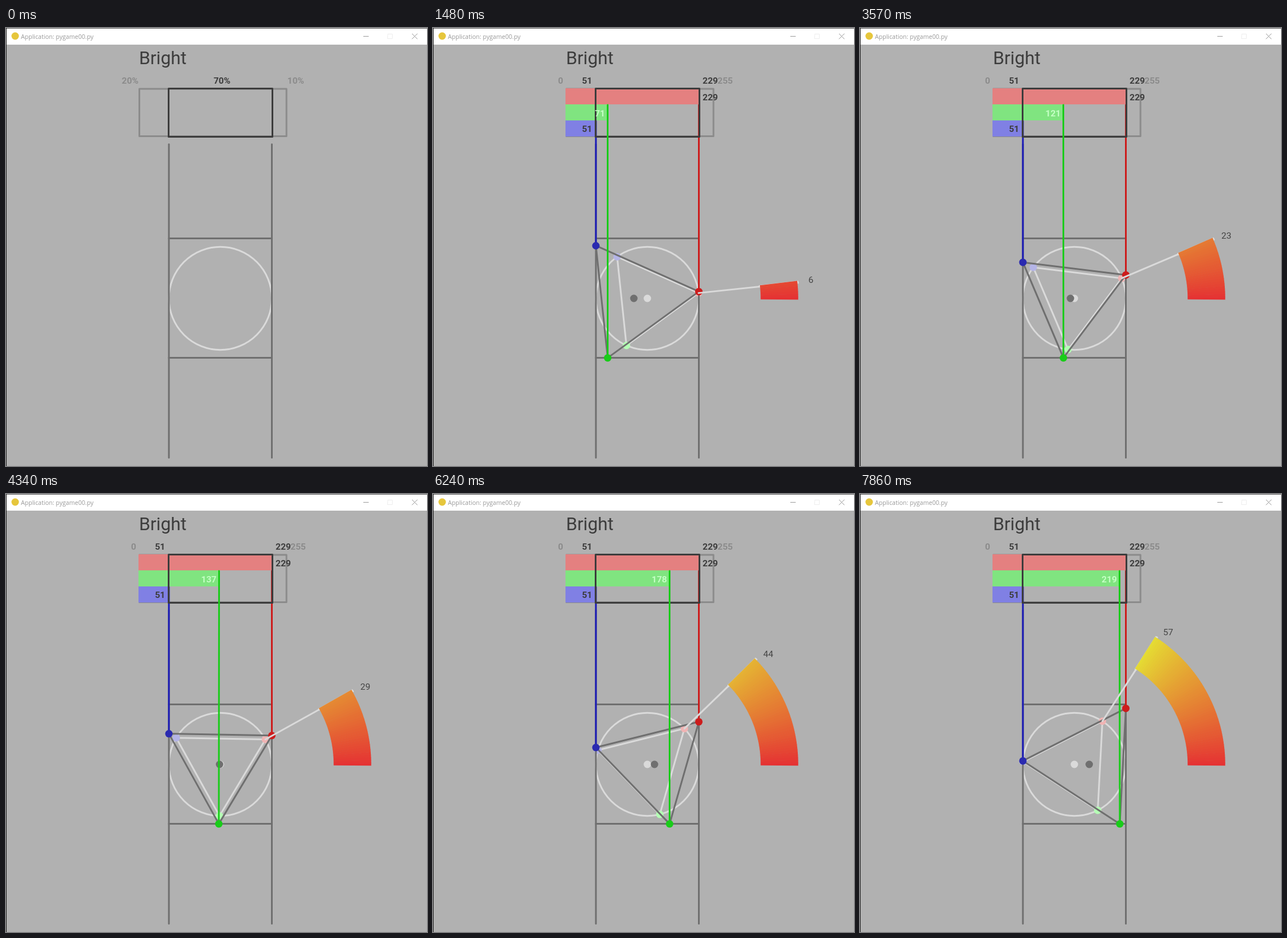
An HTML page with a canvas that plays this animation: 734x763 px, repeating every 7990 ms.

```html
<!DOCTYPE html>
<html lang="en">
<head>
<meta charset="utf-8">
<title>Bright</title>
<style>
html, body { margin: 0; width: 734px; height: 763px; overflow: hidden; }
canvas { display: block; }
</style>
</head>
<body>
<canvas id="stage" width="734" height="763"></canvas>
<script>
const ctx = document.getElementById('stage').getContext('2d');
const LOOP = 7990, INTRO = 760, FIRST = 718, STEP = 124, LAST_HUE = 57;
const LEFT = 284, RIGHT = 463.5, TOP = 366.5, BOTTOM = 574.5;
const CX = (LEFT + RIGHT) / 2, CY = 471, R = (RIGHT - LEFT) / 2;
const BAR_X = 231, BAR_Y = 105, BAR_H = 28;
const INK = '#3c3c3c', DARK = '#6f6f6f', GREY = '#8b8b8b', LIGHT = '#dadada', PAPER = '#b1b1b1';
const RED = '#cc1c1c', GREEN = '#19cc19', BLUE = '#1a1ab8';
const SMALL = '15.5px Roboto, sans-serif', BOLD = 'bold ' + SMALL;

const rad = deg => deg * Math.PI / 180;
const cos = deg => Math.cos(rad(deg));
const spread = hue => cos(hue) - cos(hue + 120);
const greenLevel = hue =>
  Math.floor(51 + 178.5 * (cos(hue + 240) - cos(hue + 120)) / spread(hue));

function polar(r, deg, x = CX) {
  return [x + r * cos(deg), CY - r * Math.sin(rad(deg))];
}

function line(color, points, width = 3, closed = false) {
  ctx.beginPath();
  points.forEach(p => ctx.lineTo(...p));
  if (closed) ctx.closePath();
  ctx.strokeStyle = color;
  ctx.lineWidth = width;
  ctx.stroke();
}

function dot(color, [x, y], r = 6.5) {
  ctx.beginPath();
  ctx.arc(x, y, r, 0, 7);
  ctx.fillStyle = color;
  ctx.fill();
}

function rect(color, x, y, w, h) {
  ctx.fillStyle = color;
  ctx.fillRect(x, y, w, h);
}

function box(color, x, y, w, h) {
  ctx.strokeStyle = color;
  ctx.lineWidth = 3;
  ctx.strokeRect(x, y, w, h);
}

function text(str, x, y, color, align = 'left', font = BOLD) {
  ctx.font = font;
  ctx.fillStyle = color;
  ctx.textAlign = align;
  ctx.fillText(str, x, y);
}

function ring(color, r0, r1, from, to) {
  ctx.beginPath();
  ctx.arc(CX, CY, r1, rad(-from), rad(-to), true);
  ctx.arc(CX, CY, r0, rad(-to), rad(-from));
  ctx.fillStyle = color;
  ctx.fill();
}

function drawWindow() {
  rect(PAPER, 0, 0, 734, 763);
  rect('#fff', 0, 0, 734, 29);
  rect('#555', 0, 0, 734, 1);
  rect('#1c1c1c', 0, 0, 1, 763);
  dot('#e6c63c', [16, 14]);
  text('Application: pygame00.py', 26, 19, '#999', 'left', '10.6px "Open Sans", sans-serif');
  line('#999', [[623, 14.5], [632, 14.5]], 1);
  line('#ededed', [[665.5, 10.5], [673.5, 10.5], [673.5, 18.5], [665.5, 18.5]], 1, true);
  line('#999', [[708, 10], [717, 19]], 1);
  line('#999', [[717, 10], [708, 19]], 1);
}

function drawCircle() {
  ctx.beginPath();
  ctx.arc(CX, CY, R, 0, 7);
  ctx.strokeStyle = LIGHT;
  ctx.lineWidth = 3;
  ctx.stroke();
}

function drawGuides() {
  for (const x of [LEFT, RIGHT]) line(DARK, [[x, 202.5], [x, 748.5]]);
  for (const y of [TOP, BOTTOM]) line(DARK, [[LEFT, y], [RIGHT, y]]);
}

function drawRange() {
  box(INK, LEFT - 0.5, 105.5, RIGHT - LEFT + 1.5, 84);
}

function drawBars(greenX) {
  [['#e48080', RIGHT], ['#80e480', greenX], ['#8080e4', LEFT]].forEach(([color, end], i) =>
    rect(color, BAR_X, BAR_Y + i * BAR_H, end - BAR_X, BAR_H));
}

function drawHand(hue) {
  line(LIGHT, [polar(R, hue), polar(264, hue)]);
  ring(LIGHT, 195.5, 265, hue - 0.5, hue + 0.65);
  for (let h = hue; h >= 0; h--)
    ring(`rgb(229,${greenLevel(h)},51)`, 197.5, 263, h - 0.5, h + 0.65);
  const [x, y] = polar(270, hue);
  text(hue, x + 16.5, y + 1, '#444', 'center', SMALL);
}

function drawHue(hue) {
  const corners = [hue, hue + 240, hue + 120];
  const inner = corners.map(d => polar(R, d));
  const size = 2 * R / spread(hue);
  const mid = RIGHT - size * cos(hue);
  const outer = corners.map(d => polar(size, d, mid));
  const [red, green, blue] = outer;
  const greenX = Math.floor(green[0]) + 0.5;

  line(LIGHT, inner, 3, true);
  ['#f0b4b4', '#b4ffb4', '#b4b4e6'].forEach((c, i) => dot(c, inner[i]));
  dot(LIGHT, [CX, CY]);
  drawGuides();
  line(DARK, outer, 3, true);
  dot(DARK, [mid - 0.5, CY]);

  drawBars(greenX);
  line(RED, [[RIGHT, 134], red]);
  line(BLUE, [[LEFT, 162], blue]);
  drawRange();
  line(GREEN, [[greenX, 134], green]);
  dot(RED, red);
  dot(GREEN, green);
  dot('#2a2ab0', blue);
  drawHand(hue);

  text('0', 227, 96.5, GREY, 'right');
  text('255', 496, 96.5, GREY);
  text('51', 277.5, 96.5, INK, 'right');
  text('229', 470, 96.5, INK);
  text('229', 470, 126, INK);
  text('51', 277.5, 181, INK, 'right');
  text(greenLevel(hue), greenX - 4.5, 153.5, '#c4ffc4', 'right');
}

function drawIntro() {
  drawGuides();
  drawRange();
  text('20%', 231, 96.5, GREY, 'right');
  text('70%', 376.5, 96.5, INK, 'center');
  text('10%', 490.5, 96.5, GREY);
}

function frame(now) {
  const t = now % LOOP;
  drawWindow();
  text('Bright', 232, 63, INK, 'left', '31.3px Roboto, sans-serif');
  box(GREY, 232.5, 106, 256.5, 82.5);
  drawCircle();
  // The hue advances one whole degree per step
  if (t < INTRO) drawIntro();
  else drawHue(Math.min(LAST_HUE, Math.floor((t - FIRST) / STEP)));
  requestAnimationFrame(frame);
}
ctx.lineCap = ctx.lineJoin = 'round';
requestAnimationFrame(frame);
</script>
</body>
</html>
```
